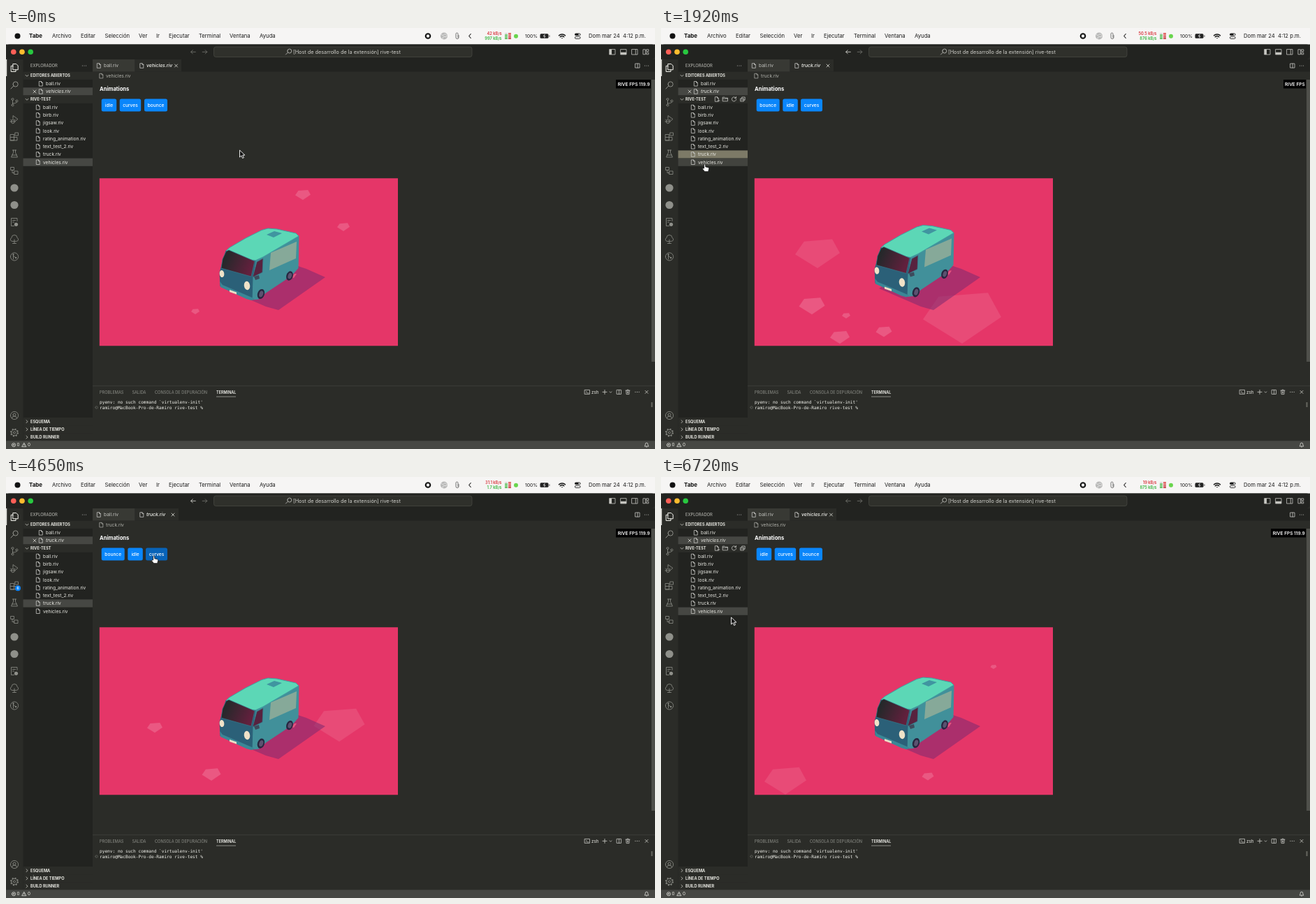
These frames come from a looping animation (929x603 px, 6750 ms). An HTML page:

```html
<!DOCTYPE html>
<html lang="es">
<head>
<meta charset="utf-8">
<title>Animations</title>
<style>
html, body { margin: 0; width: 100%; height: 100%; overflow: hidden; background: #222320; }
svg { display: block; width: 929px; height: 603px; }
text { font-family: Inter, Roboto, sans-serif; white-space: pre; }
.mono { font-family: "DejaVu Sans Mono", "Noto Sans Mono", monospace; }
</style>
</head>
<body>
<svg id="stage" viewBox="0 0 929 603">
  <defs>
    <linearGradient id="glass" x1="0" y1="0" x2="1" y2=".35">
      <stop offset=".2" stop-color="#25282a"/><stop offset="1" stop-color="#62203d"/>
    </linearGradient>
    <clipPath id="art"><rect x="133.8" y="215.3" width="427.2" height="239.9"/></clipPath>
  </defs>
</svg>
<script>
const LOOP = 6750, OPEN = 1200, READY = 1750, RESTART = 6270;
const BG = '#2b2c28', SIDE = '#222320', ROW = '#464743', LIGHT = '#e8e8e2', DIM = '#8f908a';
const stage = document.getElementById('stage');

function el(tag, attrs, parent = stage) {
  const node = document.createElementNS('http://www.w3.org/2000/svg', tag);
  for (const k in attrs) node.setAttribute(k, attrs[k]);
  return parent.appendChild(node);
}
const group = (parent = stage, attrs = {}) => el('g', attrs, parent);
const rect = (x, y, width, height, fill, parent, more) => el('rect', {x, y, width, height, fill, ...more}, parent);
const dot = (cx, cy, r, fill, parent) => el('circle', {cx, cy, r, fill}, parent);

// y is the middle of the line
function text(x, y, s, size = 6.65, fill = LIGHT, parent, more) {
  const node = el('text', {x, y: y + size * .36, 'font-size': size, fill, ...more}, parent);
  node.textContent = s;
  return node;
}
const icon = (x, y, d, stroke = DIM, parent, width = .8) =>
  el('path', {d, transform: `translate(${x} ${y})`, fill: 'none', stroke, 'stroke-width': width,
    'stroke-linecap': 'round', 'stroke-linejoin': 'round'}, parent);
const show = (node, on) => node.setAttribute('visibility', on ? 'inherit' : 'hidden');
const bold = {'font-weight': 700}, semi = {'font-weight': 600}, italic = {'font-style': 'italic'};
const middle = {'text-anchor': 'middle'}, end = {'text-anchor': 'end'};

const FILE = 'M-2.3-3.3h2.8l1.8 1.8v4.8h-4.6zM.5-3.3v1.8h1.8';
const CLOSE = 'M-2-2l4 4M2-2l-4 4';
const RIGHT = 'M-1-2l2 2-2 2', DOWN = 'M-2-1l2 2 2-2';
const SPLIT = 'M-3-3h6v6h-6zM0-3v6';
const MORE = 'M-2.6 0h.01M0 0h.01M2.6 0h.01';
const ring = r => `M${-r} 0a${r} ${r} 0 1 0 ${2 * r} 0a${r} ${r} 0 1 0 ${-2 * r} 0`;
const SEARCH = 'M-1.2 1.2L-4 4M-1.7-1a3 3 0 1 0 6 0a3 3 0 1 0-6 0';

// ---- menu bar
rect(0, 0, 929, 23.5, '#f6f5f4');
dot(16.5, 11.5, 4, '#111');
text(33, 11.5, 'Tabe', 7.9, '#111', stage, bold);
[[66, 'Archivo'], [107, 'Editar'], [141.5, 'Selección'], [190, 'Ver'], [215, 'Ir'], [233, 'Ejecutar'],
 [276, 'Terminal'], [320, 'Ventana'], [363, 'Ayuda']].forEach(([x, s]) => text(x, 11.5, s, 7.7, '#1c1c1c'));
dot(604, 11.5, 4.3, '#111');
rect(602, 9.5, 4, 4, '#f6f5f4', stage, {rx: .8});
dot(627, 11.5, 5, '#b9b9b8');
icon(627, 11.5, 'M-4-2q3 2 4 0t4 1M-2 4q0-4 3-3t3-1', '#eee');
icon(646, 11.5, 'M2-1v3a2 2 0 0 1-4 0v-5a1.5 1.5 0 0 1 3 0v5', '#555');
icon(664, 11.5, 'M1.3-3l-2.6 3 2.6 3', '#222', stage, 1.1);
const up = text(709.5, 8.3, '', 5.7, '#d8343c', stage, {...semi, ...end});
const down = text(709.5, 15.2, '', 5.7, '#33b43a', stage, {...semi, ...end});
for (let i = 0; i < 4; i++) {
  rect(714, 7 + i * 2.4, 4, 1.7, i ? '#55bd55' : '#d9d9d9');
  rect(719, 7 + i * 2.4, 4, 1.7, i < 2 ? '#dd5555' : '#c83d43');
}
dot(730, 11.7, 3, '#69d54d');
text(743, 11.5, '100%', 6.8, '#1c1c1c');
rect(764.5, 8.3, 12, 6.5, '#222', stage, {rx: 1.6});
rect(777.3, 10.3, 1.2, 2.6, '#777');
icon(770.5, 11.5, 'M.8-2.3l-2 2.5h2.4l-1 2.2', '#fff');
icon(796, 13.5, 'M-4.5-2.7a6.5 6.5 0 0 1 9 0M-2.7-.8a4 4 0 0 1 5.4 0M0 1h.01', '#111', stage, 1.5);
rect(814, 7.5, 8.5, 3.6, '#222', stage, {rx: 1.8});
rect(814.4, 12.4, 7.7, 3, 'none', stage, {rx: 1.5, stroke: '#222', 'stroke-width': .9});
dot(820.5, 9.3, 1.1, '#fff');
text(834, 11.5, 'Dom mar 24  4:12 p.m.', 7.7, '#1c1c1c');

// ---- window frame
rect(0, 23.5, 929, 579.5, BG, stage, {rx: 5});
rect(.5, 24, 928, 21, SIDE, stage, {rx: 5});
['#ff5f57', '#febc2e', '#28c840'].forEach((c, i) => dot(10.8 + i * 12.2, 34.3, 3.8, c));
const back = icon(268, 34.3, 'M3.3 0h-6.6m2.6-2.6l-2.6 2.6 2.6 2.6');
icon(284.5, 34.3, 'M-3.3 0h6.6m-2.6-2.6l2.6 2.6-2.6 2.6', '#777872');
rect(297.5, 27, 369.5, 14.5, '#2f302b', stage, {rx: 3, stroke: '#4b4c46', 'stroke-width': .7});
icon(404.5, 34, SEARCH, '#c5c5c0');
text(411, 34.3, '[Host de desarrollo de la extensión] rive-test', 7.3, '#cfcfca');
[868, 884, 900].forEach((x, i) => {
  icon(x, 34.3, 'M-4-3.7h8v7.4h-8z', '#c5c5c0');
  rect(...[[x - 4, 30.6, 3, 7.4], [x - 4, 34.8, 8, 3.2], [x + .8, 30.6, .8, 7.4]][i], '#c5c5c0');
});
icon(916, 34.3, 'M-3.7-3.5h3v7h-3zM1-3.5h2.8v2.7H1zM1 1h2.8v2.5H1z', '#c5c5c0');

// ---- activity bar
rect(0, 45, 1.2, 24, '#e8e8e2');
icon(12, 57, 'M-1.8-5.5h4.5l2.5 2.5v5.8h-7zM-1.8-2.7h-3v8.2h6.8v-2.7', '#f4f4ee', stage, 1);
icon(12, 81.5, 'M-1.2 1.5L-5 5.5M-2-1a3.6 3.6 0 1 0 7.2 0a3.6 3.6 0 1 0-7.2 0', DIM, stage, 1);
icon(12, 106, 'M-4-4a1.5 1.5 0 1 0 3 0a1.5 1.5 0 1 0-3 0M-4 4.5a1.5 1.5 0 1 0 3 0a1.5 1.5 0 1 0-3 0M2-1.5a1.5 1.5 0 1 0 3 0a1.5 1.5 0 1 0-3 0M-2.5-2.5V3M3.5 0Q3 2-2 2');
icon(12, 131, 'M-2-1v-4.5l7 5-4 3M-4.5 3a2.3 2.8 0 1 0 4.6 0a2.3 2.8 0 1 0-4.6 0M-6 3h7.5M-5.5 0l1 1M1 0L0 1');
icon(12, 155.5, 'M-5.5-3H-.5v8.5h-5zM-5.5 1H4v4.5h-9.5M1.2-5.5H5.5v4H1.2z');
icon(12, 180, 'M-1.5-5v3.5L-4.5 5h9L1.5-1.5V-5M-2.7-5h5.4M-3.3 2h6.6');
icon(12, 204.5, 'M-5-5h4.5v4H-5zM0 .5h5v4.5H0zM-3-1v4h3');
dot(12, 229, 5.6, DIM);
dot(12, 253.5, 5.6, DIM);
icon(12, 278, 'M4-1.5V-5.5h-8.5v11h4M-2.5-2.5h4M-2.5 0h2');
dot(14.5, 281.3, 2.6, DIM);
icon(12, 303, 'M0 5.5V0M-2.5 5.5h5M0 2.5H-3a2.6 2.6 0 0 1-1-5a4 4 0 0 1 8 0a2.6 2.6 0 0 1-1 5z');
icon(12, 327.5, ring(5.6) + 'M-1.5-3.5v7M-1.5-1l3.5 2.5');
dot(10.5, 324.5, 1.1, DIM);
dot(14.2, 329.2, 1.1, DIM);
icon(12, 555, ring(5.6) + 'M-2-1a2 2 0 1 0 4 0a2 2 0 1 0-4 0M-3.5 4q0-3 3.5-3t3.5 3');
icon(12, 579.5, ring(1.6) + ring(4.2));
el('circle', {cx: 12, cy: 579.5, r: 5.2, fill: 'none', stroke: DIM, 'stroke-width': 1.4, 'stroke-dasharray': '2 2.08'});
const badge = group();
dot(17, 159.3, 4, '#0a84ff', badge);
text(17, 159.3, '6', 4.8, '#fff', badge, {...middle, ...semi});

// ---- side bar
rect(24.5, 45, 99.5, 546, SIDE);
text(35, 54, 'EXPLORADOR', 5.8, '#c2c2bc');
icon(112, 54, MORE, '#bbb', stage, 1.1);
function header(y, s, d) {
  rect(24.5, y - 5.7, 99.5, 11.3, BG);
  icon(30, y, d, '#c8c8c2');
  text(35, y, s, 5.6, LIGHT, stage, bold);
}
rect(24.5, 85.3, 99.5, 11.2, ROW);
const rowY = i => 113.6 + i * 11.23;
const picked = rect(24.5, 0, 99.5, 11.2, ROW);
const hover = rect(24.5, 0, 99.5, 11.2, '#42433e');
header(68.3, 'EDITORES ABIERTOS', DOWN);
header(102.3, 'RIVE-TEST', DOWN);
[[563.7, 'ESQUEMA'], [574.9, 'LÍNEA DE TIEMPO'], [586.1, 'BUILD RUNNER']].forEach(([y, s]) => header(y, s, RIGHT));
icon(50, 79.8, FILE, '#c5c5c0');
text(57, 79.8, 'ball.riv');
icon(41, 91, CLOSE, '#d5d5d0');
icon(50, 91, FILE, '#c5c5c0');
const openName = text(57, 91, '', 6.65, LIGHT, stage, italic);
['ball', 'birb', 'jigsaw', 'look', 'rating_animation', 'text_test_2', 'truck', 'vehicles'].forEach((s, i) => {
  icon(46, rowY(i), FILE, '#c5c5c0');
  text(53, rowY(i), s + '.riv');
});
const tools = group();
icon(80, 102, FILE + 'M1 2h3', '#c5c5c0', tools);
icon(92, 102, 'M-3.5-2.8h2.5l1 1h3.5v4.6h-7zM-3.5-.8h7', '#c5c5c0', tools);
icon(104.5, 102, 'M2.6-1.8a3.1 3.1 0 1 0 .5 2M3-3.5v2H1', '#c5c5c0', tools);
icon(117, 102, 'M-3-1h4.5v4H-3zM-1.3-1v-2H3.2v4.2H1.5M-1.8 1h2', '#c5c5c0', tools);

// ---- tabs
rect(124, 45, 805, 17.5, SIDE);
rect(124, 45, 60.5, 17.5, '#383934');
icon(133, 54, FILE, '#c5c5c0');
text(140, 54, 'ball.riv', 6.65, '#c5c5c0');
const tab = rect(185, 45, 62, 17.5, BG);
icon(194.5, 54, FILE, '#c5c5c0');
const tabName = text(201, 54, '', 6.8, '#f5f5f0', stage, {...italic, 'font-weight': 500});
const tabClose = icon(0, 54, CLOSE, '#e0e0da');
icon(904, 54, SPLIT, '#c5c5c0');
icon(917, 54, MORE, '#c5c5c0', stage, 1.1);
icon(136.5, 68.6, FILE, '#a5a5a0');
const crumb = text(143, 68.6, '', 6.65, '#b0b0aa');

// ---- panel and status bar
rect(124, 512.5, 805, .6, ROW);
[[134, 'PROBLEMAS'], [180.5, 'SALIDA'], [213, 'CONSOLA DE DEPURACIÓN']].forEach(([x, s]) => text(x, 521.6, s, 5.65, DIM));
text(301, 521.6, 'TERMINAL', 5.5, '#f5f5f0', stage, semi);
rect(301, 527.7, 28, .7, '#b5b5ae');
icon(832, 521.4, 'M-3.5-3h7v6h-7zM-1.8-1.3L-.5 0l-1.3 1.3M.3 1.5h1.5', '#c5c5c0');
text(838, 521.4, 'zsh', 6.3);
icon(857, 521.4, 'M-3 0h6M0-3v6', '#d0d0ca');
icon(865.5, 521.6, 'M-1.4-.7l1.4 1.4 1.4-1.4', '#c5c5c0');
icon(877.5, 521.4, SPLIT, '#c5c5c0');
icon(890, 521.4, 'M-3-2.2h6M-1-2.2v-1h2v1M-2.3-2.2l.3 5.4h4l.3-5.4M-.6-.5v2M.6-.5v2', '#c5c5c0');
icon(903.5, 521.4, MORE, '#c5c5c0', stage, 1.1);
icon(917, 521.4, CLOSE, '#d0d0ca');
text(134, 536, "pyenv: no such command `virtualenv-init'", 6.15, '#f2f2ec', stage, {class: 'mono'});
text(134, 543.6, 'ramiro@MacBook-Pro-de-Ramiro rive-test %', 6.15, '#f2f2ec', stage, {class: 'mono'});
icon(129.5, 543.5, ring(1.7), '#75766f', stage, .6);
rect(923.5, 536, 2, 7, '#66675f');
rect(0, 591.3, 929, 11.7, ROW);
icon(11, 597.2, ring(2.6) + 'M-1-1l2 2M1-1l-2 2', '#f0f0ea', stage, .7);
text(15.5, 597.2, '0', 6.3);
icon(26, 597.2, 'M0-2.7l2.9 5.2h-5.8zM0-.8v1.5', '#f0f0ea', stage, .7);
text(31, 597.2, '0', 6.3);
icon(917, 597, 'M-2.7 1.8q1-1 .9-2.8a1.8 1.8 0 0 1 3.6 0q0 1.8.9 2.8zM-.5 3h1', '#f0f0ea', stage, .7);

// ---- preview
const view = group();
rect(924, 74, 5, 404, '#4f504b', view);
text(134, 87, 'Animations', 7.6, '#fff', view, bold);
function buttons(list) {
  const g = group(view);
  const items = list.map(([x, w, s]) => {
    const box = rect(x, 101.5, w, 18, '#0a86fb', g, {rx: 2.5});
    text(x + w / 2, 110.5, s, 6.6, '#fff', g, {...middle, 'font-weight': 500});
    return {x, w, box};
  });
  return {g, items};
}
const sets = {
  vehicles: buttons([[136.7, 21.5, 'idle'], [162.7, 30.5, 'curves'], [198, 33, 'bounce']]),
  truck: buttons([[136.7, 33, 'bounce'], [174.3, 21.5, 'idle'], [200, 31, 'curves']])
};
const fpsBox = rect(873, 74, 50, 12.5, '#000', view);
const fps = text(921.7, 80.4, '', 6.5, '#fff', view, {...semi, ...end});

const art = group(view, {'clip-path': 'url(#art)'});
rect(133, 215, 429, 241, '#e53668', art);

// rocks: moment, place at that moment, width
const rocks = [
  [0, 425, 239, 22], [0, 483, 285, 18], [0, 271, 406, 12],
  [930, 512, 323, 12], [930, 318, 453, 56],
  [1920, 224, 323, 64], [1920, 216, 398, 37], [1920, 265, 412, 12],
  [1920, 256, 443, 28], [1920, 319, 435, 23], [1920, 431, 415, 112],
  [2800, 330, 405, 20], [3570, 562, 224, 8],
  [4650, 213, 359, 22], [4650, 294, 426, 27], [4650, 477, 355, 73],
  [6720, 476, 272, 9], [6720, 382, 429, 17], [6720, 178, 435, 60]
].map(([at, x, y, w]) => ({at, x, y, w, node: el('polygon', {
  points: '-.5,.02 -.3,-.27 .33,-.32 .5,-.01 .0,.33', fill: '#fff', 'fill-opacity': w < 40 ? .17 : .1}, art)}));

// the van: polygons and ellipses whose points bend with the turn
const parts = [];
const shape = (pts, fill, more) => parts.push({
  pts: pts.split(' ').map(p => p.split(',').map(Number)),
  node: el('polygon', {fill, 'stroke-linejoin': 'round', ...more}, art)});
const oval = (x, y, rx, ry, fill, tilt) => parts.push({x, y, node: el('ellipse', {rx, ry, fill}, art), tilt});
const edge = (stroke, width) => ({stroke, 'stroke-width': width});
function wheel(x, y, r) {
  oval(x, y, r, r * 1.45, '#272640', 18);
  oval(x + .3, y, r * .56, r * .9, '#5b5270', 18);
  parts.slice(-2).forEach(p => p.spring = .6);
}

shape('312,373 326,365 418,341 430,345 457,357 390,404 372,399', '#7a2a70', {'fill-opacity': .54});
parts[0].ground = true;
shape('357,333 419,298 418,344 411,352 399,361 372,379 362,388 352,389 350,356', '#41909a', edge('#41909a', 1));
shape('315,319 357,333 353,357 352,389 346,387 307,370 306,350', '#2b6078', edge('#2b6078', 1));
shape('306,363 310,368 352,386 356,388 351,390 344,388 307,371', '#3a8796');
shape('315,319 320,314.5 343,301 366,289.5 375,287 388,288 415,294 419,298 368,328 357,333 350,332', '#5cd7b6', edge('#419ca0', 1));
shape('373,296 384,291 395,294 383,300', '#4095a0');
shape('315,320 319,318 356,334 351,356 308,344 310,331', 'url(#glass)', edge('#347a8b', .7));
shape('359,335 368,330 367,350 353,357', '#58223f', edge('#347a8b', .7));
shape('379,322 416,306 415,330 377,347', '#86a999');
shape('409,357 413,352 416,352 412,358', '#e5557f');
oval(309, 352, 3.3, 5.1, '#efe2c8', -8);
oval(345, 369, 4.2, 6.2, '#efe2c8', -8);
shape('320,375 330,378.5 330,381.5 320,378', '#eadfc6');
wheel(365, 381, 5);
wheel(406, 355, 4.7);
shape('355,356 362,354 363,359 357,361', '#3d4a5c');

function drawVan(lift, turn) {
  const bodySwing = x => 2 + 5.5 * Math.exp(-(((x - 345) / (x < 345 ? 50 : 30)) ** 2));
  const groundSwing = y => 4 + (y - 357) / 12;
  for (const p of parts) {
    const dy = p.ground ? 0 : lift * (p.spring || 1);
    const bend = (x, y) => [x - turn * (p.ground ? groundSwing(y) : bodySwing(x)), y + dy];
    if (p.pts) p.node.setAttribute('points', p.pts.map(([x, y]) => bend(x, y).join()).join(' '));
    else p.node.setAttribute('transform', `translate(${bend(p.x, p.y)}) rotate(${p.tilt})`);
  }
}

// ---- pointer
const arrow = el('path', {d: 'M0 0v10l2.4-2.2 1.7 3.7 1.8-.8-1.7-3.6h3.2z', fill: '#111', stroke: '#fff', 'stroke-width': .9});
const hand = el('path', {d: 'M-1.4 6V.7q1-1.4 2.1 0V3.8l4 1q1.2.5 1 1.9l-1 4h-5l-3.3-3.8q0-1.4 2.2-1z',
  fill: '#fff', stroke: '#111', 'stroke-width': .8});
const path = [[0, 334.5, 175], [220, 334.5, 175], [690, 100.5, 201], [930, 66, 190], [1130, 66, 179], [1500, 66, 179],
  [1920, 63, 195], [2600, 63, 195], [3300, 187.5, 134], [3570, 187.5, 134], [3850, 184, 112], [4100, 184, 112],
  [4450, 212, 113], [4800, 212, 113], [5490, 107.5, 178], [RESTART, 106, 179]];

function pointer(t) {
  const i = Math.max(1, path.findIndex(k => k[0] >= t));
  const [a, b] = [path[i - 1], path[i]];
  const u = (t - a[0]) / (b[0] - a[0]), e = u * u * (3 - 2 * u);
  return [a[1] + (b[1] - a[1]) * e, a[2] + (b[2] - a[2]) * e];
}
const latest = (list, t) => list.filter(k => k[0] <= t).pop();
const fpsLog = [[0, '119.9'], [900, '120.2'], [READY, ''], [2300, '120.9'], [3800, '119.9'], [5100, '120.0'], [5900, '119.9']];
const netLog = [[0, '42', '997'], [450, '19', '875'], [1600, '50.5', '876'], [3000, '0.8', '43.2'], [4100, '31.1', '1.7'], [5200, '0.5', '0.6']];

function draw(t) {
  const local = t >= RESTART ? t - 6030 : t;
  const truck = t >= OPEN && t < RESTART;
  const name = truck ? 'truck' : 'vehicles';
  for (const n of [openName, tabName, crumb]) n.textContent = name + '.riv';
  tab.setAttribute('width', truck ? 62 : 66);
  tabClose.setAttribute('transform', `translate(${truck ? 239 : 243.5} 54)`);
  back.setAttribute('stroke', truck ? '#e0e0da' : '#777872');
  show(badge, t >= 2400 && truck);

  const [x, y] = pointer(local);
  const inSide = x > 24.5 && x < 124;
  const row = Math.floor((y - 108) / 11.23);
  const onRow = inSide && row >= 0 && row < 8;
  const pick = truck ? 6 : 7;
  picked.setAttribute('y', rowY(pick) - 5.6);
  picked.setAttribute('fill', truck && t < 2300 ? '#7d7a67' : ROW);
  show(hover, onRow && row !== pick);
  if (onRow) hover.setAttribute('y', rowY(row) - 5.6);
  show(tools, inSide);

  let onButton = false;
  for (const key in sets) {
    show(sets[key].g, key === name);
    for (const b of sets[key].items) {
      const over = key === name && y > 101.5 && y < 119.5 && x > b.x && x < b.x + b.w;
      b.box.setAttribute('fill', over ? '#0863b8' : '#0a86fb');
      onButton = onButton || over;
    }
  }
  const useHand = onRow || onButton;
  show(hand, useHand);
  show(arrow, !useHand);
  (useHand ? hand : arrow).setAttribute('transform', `translate(${x} ${y})`);

  const net = latest(netLog, local);
  up.textContent = net[1] + ' kB/s';
  down.textContent = net[2] + ' kB/s';
  const rate = latest(fpsLog, t)[1];
  fps.textContent = ('RIVE FPS ' + rate).trim();
  fpsBox.setAttribute('x', rate ? 873 : 891);
  fpsBox.setAttribute('width', rate ? 50 : 32);

  view.setAttribute('visibility', t >= OPEN && t < READY ? 'hidden' : 'visible');
  for (const r of rocks) {
    const s = (t - r.at) / 1000;
    r.node.setAttribute('transform', `translate(${r.x + 470 * s} ${r.y - 290 * s}) scale(${r.w})`);
    show(r.node, Math.abs(s) < .95);
  }
  let lift = truck ? 1 : 0, turn = 0;
  if (truck && t < 3900) lift -= 5.5 * Math.abs(Math.sin(Math.PI * (t - 3570) / 471.4));
  if (truck && t >= 4800) turn = Math.sin(2 * Math.PI * (t - 4800) / 2760);
  drawVan(lift, turn);
}

const start = performance.now();
function tick() {
  const t = (performance.now() - start) % LOOP;
  draw(Math.floor(t / 30) * 30);
  requestAnimationFrame(tick);
}
tick();
</script>
</body>
</html>
```
